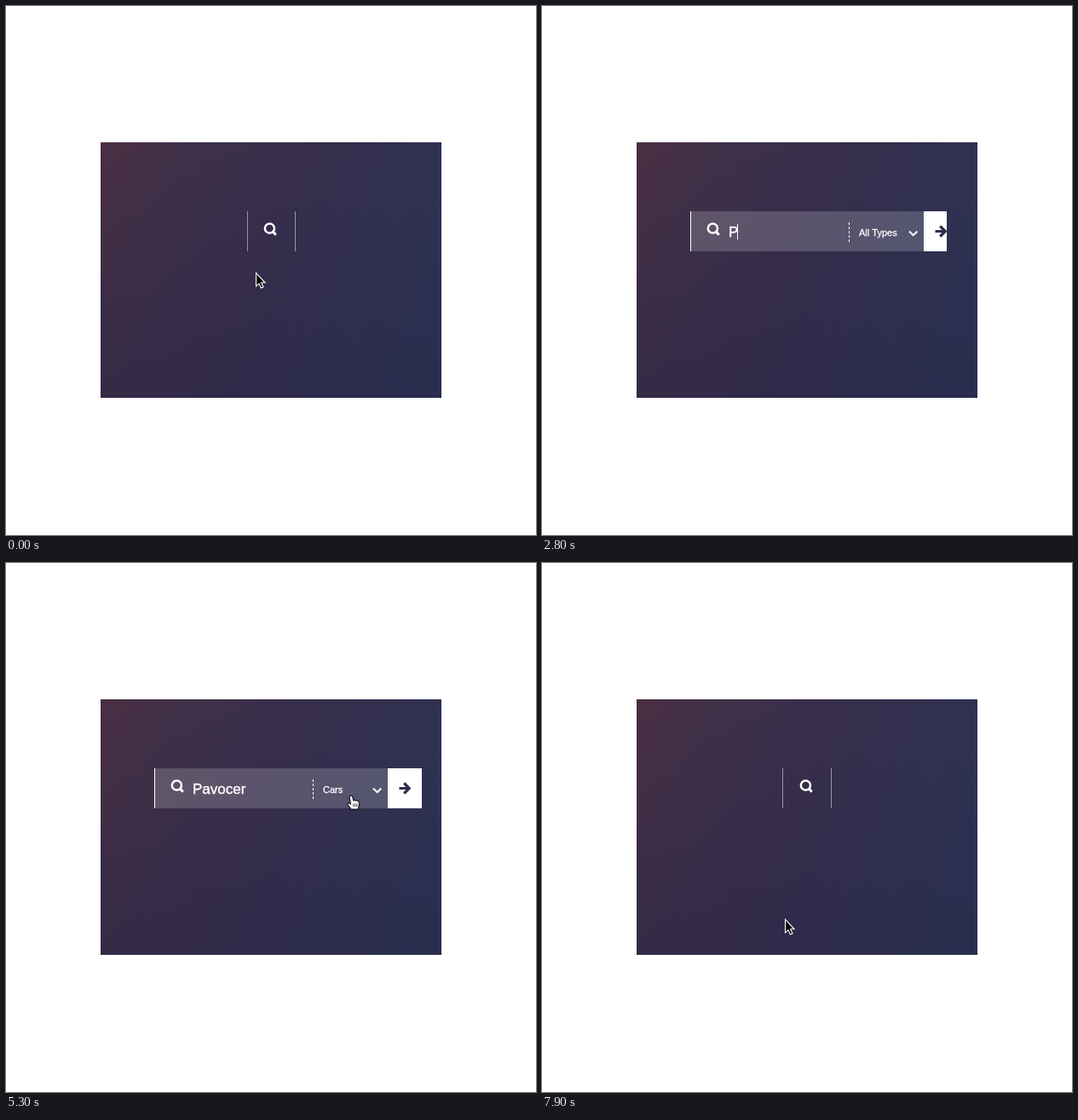
An HTML page with a canvas that plays this animation: 622x621 px, repeating every 8 s.

```html
<!DOCTYPE html>
<html lang="en">
<head>
<meta charset="utf-8">
<title>Expanding search field</title>
<style>
html, body { margin: 0; width: 100%; height: 100%; overflow: hidden; background: #fff; }
canvas { display: block; }
</style>
</head>
<body>
<canvas id="stage" width="622" height="621"></canvas>
<script>
const ctx = document.getElementById('stage').getContext('2d');
const LOOP = 8000, STEP = 100;
const QUERY = 'Pavocer';
const TYPES = ['All Types', 'Cars', 'Trucks', 'Hatchbacks', 'Vans'];
const UI_FONT = '"Liberation Sans", Arial, sans-serif';
const MENU_FONT = '10.5px "DejaVu Sans", sans-serif';
const TOP = 241, HEIGHT = 47;

// Pointer hot spot: time, x, y
const POINTER = [
  [200, 293, 313], [800, 299, 281], [3800, 299, 281], [4300, 384, 268],
  [4500, 384, 268], [4700, 384, 275], [5000, 386, 277], [5300, 405, 273],
  [5500, 463, 270], [5600, 452, 275], [6000, 390, 304], [6300, 289, 264],
  [6500, 289, 264], [6800, 285, 418]
];

const ARROW = new Path2D('M.5 .5V16L4 12.8L6.4 18L9 16.9L6.6 11.8H11Z');
const HAND = new Path2D('M-1 .5Q1 -.3 1.6 1.5L3 6L4 5.3Q5 5 5.6 6L6.5 5.7Q7.6 5.5 8 6.7Q9.2 6.4 9.4 8V11.5L8 16H0L-3.5 11Q-4.6 9 -3 8.5L-.5 10L-1.9 2Q-2 1 -1 .5Z');
const IBEAM = new Path2D('M-4 -7.5H-2Q0 -7.5 0 -5.5Q0 -7.5 2 -7.5H4M0 -5.5V5.5M-4 7.5H-2Q0 7.5 0 5.5Q0 7.5 2 7.5H4M-2 1H2');

const ramp = (t, a, b) => Math.min(1, Math.max(0, (t - a) / (b - a)));
const smooth = p => p * p * (3 - 2 * p);
const easeOut = p => 1 - (1 - p) ** 3;
const between = (t, a, b) => t >= a && t < b;

function rect(x, y, w, h, fill) {
  ctx.fillStyle = fill;
  ctx.fillRect(x, y, w, h);
}

function stroke(path, color, width) {
  ctx.strokeStyle = color;
  ctx.lineWidth = width;
  ctx.stroke(path);
}

function at(x, y, draw) {
  ctx.save();
  ctx.translate(x, y);
  draw();
  ctx.restore();
}

function label(text, x, y, size, weight) {
  ctx.font = `${size}px ${UI_FONT}`;
  ctx.fillStyle = ctx.strokeStyle = '#fff';
  ctx.lineWidth = weight;
  ctx.fillText(text, x, y);
  ctx.strokeText(text, x, y);
}

function background() {
  rect(0, 0, 622, 621, '#fff');
  const across = ctx.createLinearGradient(111, 160, 500, 320);
  [[0, '#4b2f43'], [.22, '#3f3048'], [.55, '#372f4d'], [1, '#2e3354']]
    .forEach(s => across.addColorStop(...s));
  rect(111, 160, 400, 300, across);
  const down = ctx.createLinearGradient(0, 160, 0, 460);
  down.addColorStop(0, 'rgba(40,32,66,0)');
  down.addColorStop(1, 'rgba(32,28,62,.28)');
  rect(111, 160, 400, 300, down);
}

function searchIcon(x) {
  at(x, 254, () => {
    stroke(new Path2D('M13 7A5.6 5.6 0 1 1 1.8 7A5.6 5.6 0 1 1 13 7Z'), '#fff', 2.5);
    stroke(new Path2D('M11.2 11L14.8 14.6'), '#fff', 2.9);
  });
}

function selectBox(x, text, alpha) {
  ctx.save();
  ctx.globalAlpha = alpha;
  for (let y = 254; y < 278; y += 5) rect(x, y, 1, 3, '#fff');
  label(text, x + 12, 270, 11, .3);
  at(x + 71, 264, () => stroke(new Path2D('M0 .5L4.7 5.2L9.4 .5'), '#fff', 2));
  ctx.restore();
}

function submitButton(x, width) {
  if (width <= 0) return;
  ctx.save();
  ctx.beginPath();
  ctx.rect(x, TOP, width, HEIGHT);
  ctx.clip();
  rect(x, TOP, 40, HEIGHT, '#fff');
  at(x + 12, 264.5, () =>
    stroke(new Path2D('M1.5 0H13M7.2 -6L13.2 0L7.2 6'), '#332d4b', 3.2));
  ctx.restore();
}

function menu(active, alpha) {
  ctx.save();
  ctx.globalAlpha = alpha;
  ctx.shadowColor = 'rgba(0,0,0,.4)';
  ctx.shadowBlur = 12;
  ctx.shadowOffsetY = 4;
  ctx.fillStyle = '#f7f7f7';
  ctx.beginPath();
  ctx.roundRect(350, 253, 104, 88, 4.5);
  ctx.fill();
  ctx.shadowColor = 'transparent';
  const blue = ctx.createLinearGradient(0, 257 + active * 16, 0, 273 + active * 16);
  blue.addColorStop(0, '#4f7ff3');
  blue.addColorStop(1, '#1b50e8');
  rect(350, 257 + active * 16, 104, 16, blue);
  ctx.font = MENU_FONT;
  TYPES.forEach((type, i) => {
    ctx.fillStyle = i === active ? '#fff' : '#000';
    ctx.fillText(type, 371, 268 + i * 16);
  });
  at(356, 261, () =>
    stroke(new Path2D('M.5 4.5L3 8L7 .5'), active ? '#000' : '#fff', 1.6));
  ctx.restore();
}

function pointerAt(t) {
  const next = POINTER.findIndex(k => k[0] > t);
  if (next === 0) return POINTER[0].slice(1);
  if (next < 0) return POINTER.at(-1).slice(1);
  const [t0, x0, y0] = POINTER[next - 1], [t1, x1, y1] = POINTER[next];
  const p = smooth(ramp(t, t0, t1));
  return [x0 + (x1 - x0) * p, y0 + (y1 - y0) * p];
}

function pointer(t, left, right, menuOpen) {
  if (between(t, 2700, 3900)) return;
  const [x, y] = pointerAt(t).map(Math.round);
  const inside = between(x, left, right) && between(y, TOP, TOP + HEIGHT);
  const overText = t > 3800 && between(x, 215, 350) && between(y, 250, 279);
  at(x, y, () => {
    if (overText) {
      stroke(IBEAM, 'rgba(255,255,255,.3)', 2.5);
      stroke(IBEAM, '#211c2c', 1.1);
      return;
    }
    const hand = inside && !menuOpen;
    const shape = hand ? HAND : ARROW;
    ctx.shadowColor = 'rgba(0,0,0,.4)';
    ctx.shadowBlur = 2;
    ctx.shadowOffsetY = 1;
    ctx.fillStyle = hand ? '#fff' : '#000';
    ctx.fill(shape);
    ctx.shadowColor = 'transparent';
    stroke(shape, hand ? '#15121c' : '#fff', 1.1);
    if (hand) stroke(new Path2D('M2.8 9.5V13M4.8 9.5V13M6.8 9.5V13'), '#15121c', .8);
  });
}

function draw(t) {
  const open = t < 6900
    ? easeOut(ramp(t, 1050, 1750))
    : 1 - easeOut(ramp(t, 6900, 7750));
  const left = Math.round(283 - 109 * open) - (t >= 7400 ? 1 : 0);
  const right = Math.round(339 + 109 * open);
  const content = 1 - ramp(t, 6850, 7100);
  const glow = .5 + .5 * (ramp(t, 500, 800) - ramp(t, 6900, 7500));
  const line = `rgba(255,255,255,${glow})`;
  const menuOpen = between(t, 4400, 5200);

  background();
  rect(left, TOP, right - left, HEIGHT, `rgba(255,255,255,${.18 * open})`);
  rect(left, TOP, 1, HEIGHT, line);
  rect(right, TOP, 1, HEIGHT, line);
  searchIcon(Math.round(302 - 109 * open));

  ctx.save();
  ctx.beginPath();
  ctx.rect(left, TOP, right - left, HEIGHT);
  ctx.clip();
  ctx.globalAlpha = content;
  const typed = QUERY.slice(0, Math.max(0, Math.floor((t - 2550) / 150)));
  label(typed, left + 45, 271, 17, .4);
  const blink = between(t, 1800, 2300) || between(t, 2600, 3800) || between(t, 6300, 6800);
  if (blink) rect(Math.round(left + 45 + ctx.measureText(typed).width) - (typed ? 1 : 0), 256, 1, 18, '#fff');
  selectBox(right - 88, TYPES[t < 5000 ? 0 : 1], ramp(t, 1780, 2500) * content);
  ctx.restore();

  submitButton(right, Math.round(40 * easeOut(ramp(t, 2700, 3020)) * content));
  if (menuOpen) menu(t < 4600 ? 0 : 1, 1 - ramp(t, 5000, 5200));
  pointer(t, left, right + 40 * content * (t > 2700), menuOpen);
}

function tick() {
  const t = performance.now() % LOOP;
  draw(Math.floor(t / STEP) * STEP);
  requestAnimationFrame(tick);
}
tick();
</script>
</body>
</html>
```
